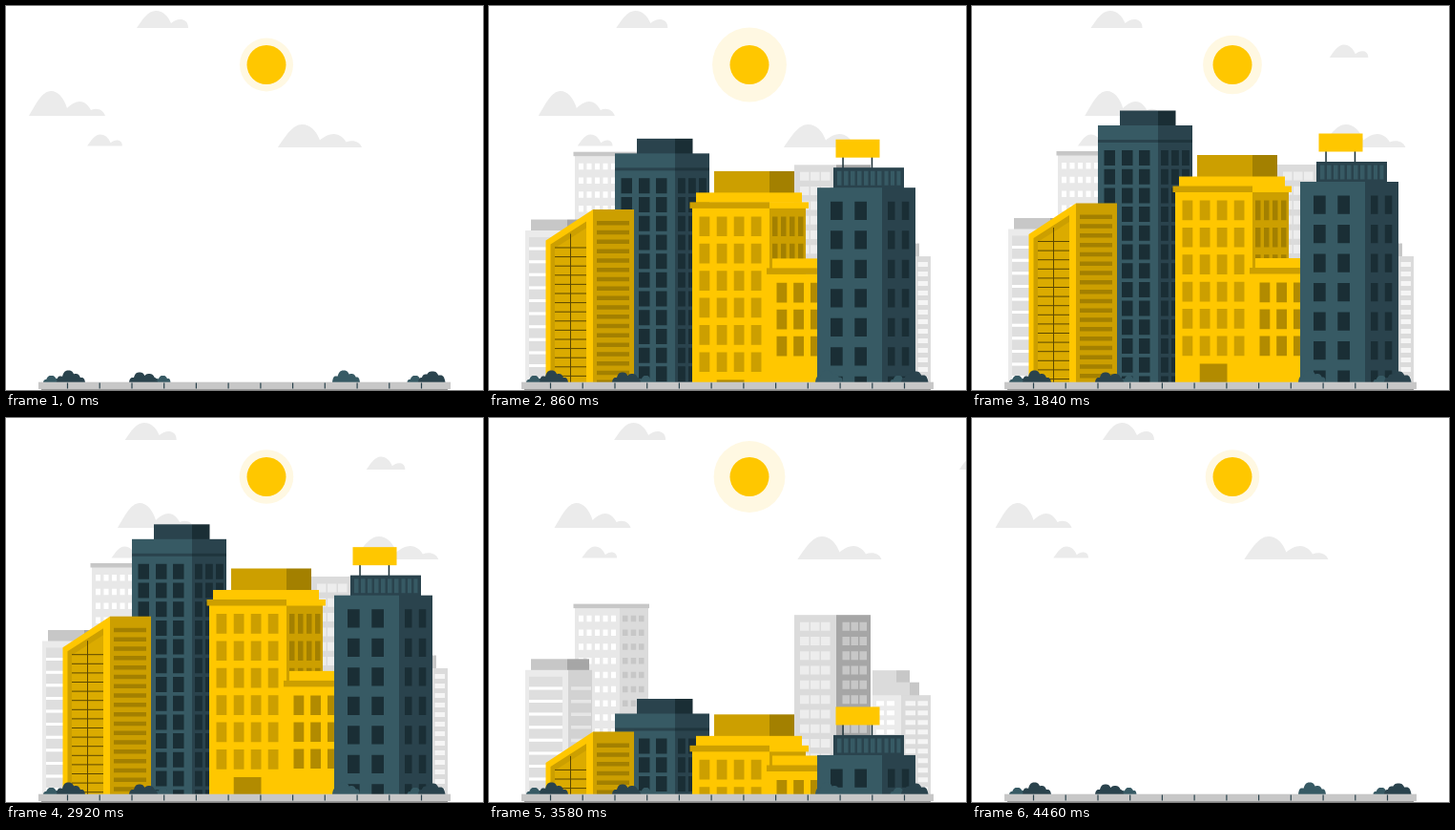
Recreate the animation shown at these times as an HTML page. Size 500 by 402 pixels, loop 4.6 s.

```html
<!DOCTYPE html>
<html lang="en">
<head>
<meta charset="utf-8">
<title>City skyline</title>
<style>
html, body { margin: 0; width: 100%; height: 100%; overflow: hidden; background: #fff; }
svg { display: block; width: 500px; height: 402px; }
</style>
</head>
<body>
<svg id="stage" viewBox="0 0 500 402" xmlns="http://www.w3.org/2000/svg"></svg>
<script>
const LOOP = 4600, GROUND = 394;
const YELLOW = '#ffc700', GOLD = '#cc9f00', OCHRE = '#a38000', DOOR = '#b28b00';
const TEAL = '#375a64', DEEP = '#2a434d', NIGHT = '#1a2e35';
const CLOUD = '#ebebeb', PALE = '#dbdbdb', GREY = '#c7c7c7', SLATE = '#a6a6a6';

const rect = (x, y, x2, y2, fill) =>
  `<rect x="${x}" y="${y}" width="${x2 - x}" height="${y2 - y}" fill="${fill}"/>`;
const poly = (points, fill) => `<polygon points="${points}" fill="${fill}"/>`;

// Rows of equal panes at the given column positions, down to the ground.
function panes(cols, w, h, top, pitch, fill, end = GROUND) {
  let d = '';
  for (let y = top; y < end; y += pitch)
    for (const x of cols) d += `M${x} ${y.toFixed(1)}h${w}v${h}h${-w}z`;
  return `<path d="${d}" fill="${fill}"/>`;
}

function leftOffice() {
  return rect(44, 222, 82, 234, GREY) + rect(82, 222, 105, 234, SLATE) +
    rect(38, 233.5, 83, GROUND, CLOUD) + rect(83, 233.5, 108, GROUND, '#d2d2d2') +
    panes([42], 35, 10.6, 240.5, 13.6, '#dedede') +
    panes([42], 35, 3, 251.1, 13.6, '#fff') +
    panes([86], 21, 3.5, 251, 13.6, '#e6e6e6');
}

function leftHighRise() {
  return rect(90, 155, 137, GROUND, '#e8e8e8') + rect(137, 155, 167, GROUND, PALE) +
    rect(88.5, 152, 168, 156.5, GREY) +
    panes([94, 102.5, 111, 119.5, 128], 5, 6.5, 164, 14.8, '#fff') +
    panes([140, 148.7, 157], 5.5, 6.5, 164, 14.8, GREY);
}

function rightHighRise() {
  return rect(320, 166, 364, GROUND, PALE) + rect(364, 166, 400, GROUND, SLATE) +
    panes([326, 337, 348], 9.5, 9, 173.5, 15.3, '#ededed') +
    panes([370.5, 379.5, 388.5], 7.5, 9, 173.5, 15.3, GREY);
}

function rightOffice() {
  return rect(402, 236, 427, 263, PALE) + rect(427, 236, 441, 263, GREY) +
    rect(427, 248.5, 441, 263, PALE) + rect(441, 248.5, 451, 263, GREY) +
    rect(402, 262, 432, GROUND, CLOUD) + rect(432, 262, 463, GROUND, PALE) +
    panes([406, 417], 8, 5, 268, 10, '#fff') +
    panes([436.5, 449.5], 10.5, 5, 268, 10, '#f5f5f5');
}

function tealTower() {
  return rect(155, 109.5, 195, 126, DEEP) + rect(195, 109.5, 213.5, 126, NIGHT) +
    rect(132, 125, 195, GROUND, TEAL) + rect(195, 125, 231, GROUND, DEEP) +
    rect(132, 140, 195, 143, DEEP) + rect(195, 140, 231, 143, '#1f353d') +
    panes([138.5, 157, 175], 11.5, 16, 151, 19.7, NIGHT) +
    panes([198, 209, 220], 7.8, 16, 151, 19.7, NIGHT);
}

function slopedBlock() {
  let lines = 'M85.5 232V394';
  for (let y = 246.5; y < GROUND; y += 9.6) lines += `M69 ${y.toFixed(1)}H102`;
  return poly('59.5,239 109,206.5 109,394 59.5,394', YELLOW) +
    poly('64.5,243 102,219 102,394 64.5,394', GOLD) +
    poly('69,247 102,226 102,394 69,394', '#dbab00') +
    `<path d="${lines}" stroke="#5c4800" stroke-width="1" fill="none"/>` +
    rect(109, 206.5, 152, GROUND, GOLD) +
    panes([113], 34, 4.5, 218.5, 9.8, OCHRE);
}

function goldBlock() {
  return rect(236, 156, 294, 180, GOLD) + rect(294, 156, 320, 180, OCHRE) +
    rect(213, 194, 294, GROUND, YELLOW) + rect(294, 194, 332, GROUND, GOLD) +
    rect(217, 178.5, 328, 189, YELLOW) +
    rect(210.5, 188.5, 294, 195, GOLD) + rect(294, 188.5, 335, 195, YELLOW) +
    panes([220.5, 238.7, 256.7, 274.7], 10.8, 20.7, 203.5, 28.4, GOLD, 370) +
    panes([297, 306, 315, 324], 5.5, 20.7, 203.5, 28.4, OCHRE, 370) +
    rect(238.7, 374.5, 267.5, GROUND, DOOR);
}

function goldWing() {
  return rect(297, 264, 352, 275, YELLOW) + rect(294, 280, 352, GROUND, YELLOW) +
    rect(291, 274, 352, 280.5, GOLD) +
    panes([301.5, 319.2, 337], 10.8, 20.7, 289.5, 28, DOOR, 370);
}

function signBlock() {
  return rect(370.3, 151, 371.8, 164, NIGHT) + rect(400.7, 151, 402.2, 164, NIGHT) +
    rect(363.5, 133.5, 409.5, 152.5, YELLOW) +
    rect(361, 163, 435, 185, DEEP) +
    panes([365, 372, 379, 386, 393, 400, 407], 4.5, 15, 166.5, 99, TEAL) +
    panes([414.5, 421, 427.5], 4, 15, 166.5, 99, TEAL) +
    rect(344, 184, 412, GROUND, TEAL) + rect(412, 184, 447, GROUND, DEEP) +
    panes([358, 383.3], 12.7, 19.3, 198.5, 30.5, NIGHT) +
    panes([418, 432.8], 7.5, 19.3, 198.5, 30.5, NIGHT);
}

// Back to front: shape, travel, rise start, rise time, fall start.
const FRONT = 2487, BACK = 2738, FALL = 1193;
const blocks = [
  [leftHighRise, 242, 171, 1000, BACK],
  [leftOffice, 172, 188, 1100, BACK],
  [rightHighRise, 228, 130, 1000, BACK],
  [rightOffice, 160, 65, 1000, BACK],
  [tealTower, 284.5, 424, 1197, FRONT],
  [slopedBlock, 188, 353, 1037, FRONT],
  [goldBlock, 238, 245, 1499, FRONT],
  [goldWing, 138, 375, 700, FRONT],
  [signBlock, 260.5, 301, 1063, FRONT],
];

const smallCloud = 'M0 18C6 9 12 0 20 0C28 0 33 6 36 13C40 10 43 8.500 47 9C52 10 54 13 54 18Z';
const bigCloud = 'M0 26C7 14 14 0 23 0C31 0 37 8 40 18C44 14 49 11 53 11C59 11 63 16 65 20C72 17 78 20 80 26Z';
// Shape, x, y, x scale, y scale, drift.
const clouds = [
  [smallCloud, 137, 5, 1, 1, -14],
  [bigCloud, 24, 89, 1, 1, 106],
  [smallCloud, 85.2, 134.5, .68, .67, 29],
  [bigCloud, 285, 124, 1.1, .92, 91.5],
  [smallCloud, 599, 40.5, .75, .75, -252],
];

const bump = (x, r, top) =>
  `M${x - r} ${GROUND}C${x - r * .8} ${top} ${x - r * .35} ${top} ${x} ${top}` +
  `C${x + r * .35} ${top} ${x + r * .8} ${top} ${x + r} ${GROUND}Z`;
const bush = (fill, bumps) =>
  `<path d="${bumps.map(b => bump(...b)).join('')}" fill="${fill}"/>`;

function bushes() {
  return bush(TEAL, [[42, 3, 391], [47.5, 6, 387], [54, 4, 390]]) +
    bush(DEEP, [[57, 4, 387.5], [65.500, 7.500, 381.5], [73, 6, 385], [79, 4, 389]]) +
    bush(TEAL, [[157, 5, 390], [164.5, 5.5, 387], [170, 2.5, 390]]) +
    bush(DEEP, [[133, 4, 389], [140, 7, 383.5], [150, 7, 385], [155, 4, 389]]) +
    bush(TEAL, [[346, 4, 387.5], [354, 7.5, 381.5], [362, 6, 385], [367.5, 3.5, 388.5]]) +
    bush(TEAL, [[423, 2.5, 391], [429, 6, 387], [435, 4, 390]]) +
    bush(DEEP, [[436, 4, 389], [440, 5, 385.5], [447, 8, 382.5], [455, 5.5, 386.5]]);
}

function pavement() {
  let ticks = '';
  for (let i = 0; i < 12; i++) ticks += `M${(64.5 + i * 33.73).toFixed(1)} 394.500V400.500`;
  return rect(37, 400, 463, 402, '#999') + rect(34, 393.7, 466, 401, GREY) +
    `<path d="${ticks}" stroke="${DEEP}" stroke-width="1.200"/>`;
}

const stage = document.getElementById('stage');
stage.innerHTML =
  `<defs><clipPath id="sky"><rect width="500" height="${GROUND}"/></clipPath></defs>` +
  `<rect width="500" height="402" fill="#fff"/>` +
  `<circle id="halo" cx="273" cy="61.5" r="28" fill="#fff8e2"/>` +
  `<circle cx="273" cy="61.5" r="20.5" fill="${YELLOW}"/>` +
  clouds.map(c => `<path class="cloud" d="${c[0]}" fill="${CLOUD}"/>`).join('') +
  `<g clip-path="url(#sky)">` +
  blocks.map(b => `<g class="block">${b[0]()}</g>`).join('') +
  `</g>` + bushes() + pavement();

const halo = document.getElementById('halo');
const cloudEls = stage.querySelectorAll('.cloud');
const blockEls = stage.querySelectorAll('.block');

const unit = v => Math.max(0, Math.min(1, v));
const cubic = p => p < .5 ? 4 * p ** 3 : 1 - 4 * (1 - p) ** 3;

// Bezier ease with handles (.42, 0) and (.58, 1).
function easeInOut(p) {
  let lo = 0, hi = 1, s = .5;
  for (let i = 0; i < 24; i++) {
    s = (lo + hi) / 2;
    const r = 1 - s;
    if (3 * r * r * s * .42 + 3 * r * s * s * .58 + s ** 3 < p) lo = s; else hi = s;
  }
  return s * s * (3 - 2 * s);
}

function drift(t) {
  const turn = 2390;
  return easeInOut(unit(t < turn ? (t - 20) / (turn - 20) : (4570 - t) / (4570 - turn)));
}

function sunk(t, start, time, fall) {
  return t < 2400 ? (1 - unit((t - start) / time)) ** 5 : unit((t - fall) / FALL) ** 5;
}

function draw(t) {
  const beat = (t / LOOP * 6) % 2;
  halo.setAttribute('r', (28 + 11 * cubic(beat < 1 ? beat : 2 - beat)).toFixed(2));
  const shift = drift(t);
  clouds.forEach(([, x, y, sx, sy, far], i) => cloudEls[i].setAttribute('transform',
    `translate(${(x + far * shift).toFixed(2)} ${y}) scale(${sx} ${sy})`));
  blocks.forEach(([, travel, start, time, fall], i) => blockEls[i].setAttribute('transform',
    `translate(0 ${(travel * sunk(t, start, time, fall)).toFixed(2)})`));
}

const begin = performance.now();
function tick() {
  draw((performance.now() - begin) % LOOP);
  requestAnimationFrame(tick);
}
tick();
</script>
</body>
</html>
```
